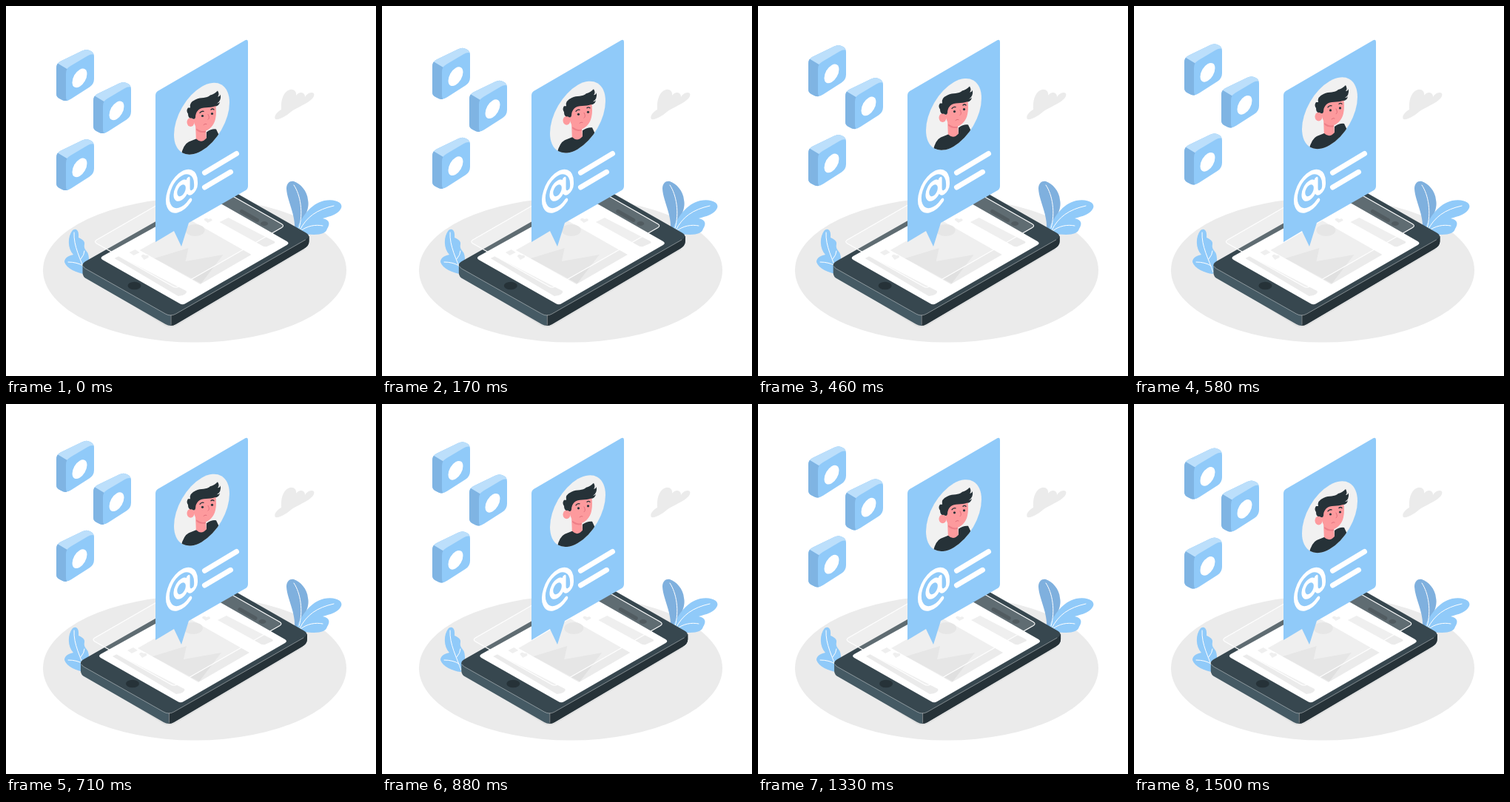
Recreate the animation shown at these times as an HTML page. Size 500 px wide and 500 px high, loop 1540 ms.

```html
<!DOCTYPE html>
<html lang="en">
<head>
<meta charset="utf-8">
<title>Profile card</title>
<style>
  html, body { margin: 0; height: 100%; overflow: hidden; background: #fff; }
  svg { display: block; width: 100%; height: 100%; }
  .line { fill: none; stroke: #fff; stroke-linecap: round; stroke-linejoin: round; }
  .blue { fill: #90caf9; }
  .dark { fill: #263238; }
  .skin { fill: #fd9a9d; }
</style>
</head>
<body>
<svg viewBox="0 0 500 500">
  <defs>
    <g id="tile">
      <path class="blue" d="M0 26Q0 19 6 16L35 2Q41-1 46 2Q51 4 51 10V40Q51 47 45 51L20 67Q14 71 9 69L5 67Q0 65 0 60Z"/>
      <path fill="#7fb4e3" d="M0 26Q0 21 2 19L14.500 26.500Q13 29 13 33V63Q13 68 14.500 69.600Q11 70 9 69L5 67Q0 65 0 60Z"/>
      <path fill="#bcdffb" d="M2 19Q3 17.500 6 16L35 2Q41-1 46 2Q50 4 50.500 7Q47 6 42 9L20 22Q15 25 14.500 26.500Z"/>
      <circle r="11.500" fill="#fff" transform="matrix(.866 -.5 0 1 31.500 39)"/>
    </g>
    <clipPath id="portrait"><circle r="43.300" transform="matrix(.866 -.5 0 1 264.500 152.800)"/></clipPath>
  </defs>

  <ellipse cx="255" cy="357" rx="205" ry="97.500" fill="#ebebeb"/>
  <path fill="#ebebeb" d="M364 153C361 148 368 142 372 140C371 127 375 115 384 113C390 112 393 117 392 121C396 115 404 116 404 123C406 119 412 115 416 118C418 123 412 127 408 130C400 135 390 139 385 143C378 149 370 154 364 153Z"/>

  <!-- leaves -->
  <path fill="#7fb0de" d="M390 304C392 282 380 264 379 247C379 239 384 236 389 237C398 240 407 250 408 262C411 275 402 286 395 304Z"/>
  <path class="blue" d="M391 306C398 286 412 267 430 263C445 260 456 266 453 273C449 282 438 284 428 287C438 289 438 295 434 301C432 309 420 311 396 307Z"/>
  <path class="line" d="M396 300C402 280 398 255 389 242M397 303C406 285 420 275 443 270M398 304C407 297 418 295 428 297"/>
  <path class="blue" d="M106 362C96 361 82 355 79 346C79 339 87 337 91 336C83 328 83 311 90 303C96 299 99 305 98 313C103 315 107 318 106 322C105 327 107 329 110 333C113 338 112 348 112 358Z"/>
  <path class="line" d="M107 360C101 342 91 325 92 306M84 346Q96 346 104 351M101 342Q106 336 106 331"/>

  <g id="phone">
    <path fill="#e0e0e0" d="M104 363L214 432Q222 436 230 432L404 329L400 324L222 420Z"/>
    <path fill="#455a64" d="M103 350V361Q103 366 109 369L215 430Q222 434 229 430L402 328Q409 324 409 318V311Z"/>
    <path class="dark" d="M222 416V432Q226 432 229 430L402 328Q409 324 409 318V311Z"/>
    <path fill="#37474f" d="M107 345Q99 350 107 355L215 416Q222 420 229 416L404 316Q413 311 404 306L297 245Q290 241 283 245Z"/>
    <path class="line" stroke-width=".8" opacity=".5" d="M104 352Q105 354 107 355L215 416Q222 420 229 416L404 316M222.500 418V431"/>
    <path fill="#fff" d="M130 338Q126 340.500 130 343L234 402Q238 404.500 242 402L379 323Q383 320.500 379 318L274 258Z"/>
    <ellipse class="dark" cx="173" cy="378" rx="9" ry="5.200"/>
    <path class="line" style="stroke:#263238" stroke-width="5" d="M318 277.500L339 289.500"/>
    <ellipse class="dark" cx="348.500" cy="294" rx="5" ry="3"/>

    <!-- screen content -->
    <g fill="#ebebeb">
      <path d="M180 330L250 290L331 336L262 376Z"/>
      <path d="M146 341L152 338L243 385Q245 388 238 391L232 392Z"/>
      <path d="M300 286L362 318Q364 320 361 321L352 325Q348 326 344 323L288 292Z"/>
      <path d="M166 333L174 329L180 333L172 337Z"/>
      <path d="M182 338Q184 334 188 337Q193 336 192 340L186 343Z"/>
      <path d="M267 289Q268 285 273 288Q278 286 278 290L272 293Z"/>
    </g>
    <g fill="#e0e0e0">
      <ellipse cx="255" cy="303" rx="13" ry="8"/>
      <path d="M200 341L246 327L242 345L293 336L263 375Z"/>
    </g>

    <!-- glass pane -->
    <path fill="#fff" fill-opacity=".2" stroke="#fff" stroke-width="1.100" d="M122 316Q118 318.500 122 321L225 379Q229 381.500 233 379L372 299.500Q376 297 372 294.500L269 236Q265 234 261 236Z"/>
  </g>

  <!-- card -->
  <path class="blue" d="M202 121Q202 117 205 115L322 47Q327 43.500 327 49V243Q327 247 324 249L247 293L237 325L227 304L202 319Z"/>
  <g class="line">
    <path stroke-width="5.600" transform="matrix(.866 -.5 0 1.080 237.500 250)" d="M13 18A22 22 0 1 1 22 0V3a6 6 0 0 1-12 0V-10M9 -1A9.500 9.500 0 1 0-10-1A9.500 9.500 0 1 0 9-1"/>
    <path stroke-width="7" d="M268.500 225.300L311.500 199.500M268.500 245L303.500 224.300"/>
  </g>

  <g id="avatar">
    <g clip-path="url(#portrait)">
      <path fill="#f1f1f1" d="M220 90H310V210H220Z"/>
      <path class="skin" d="M256 160L257 184Q266 190 271 180L270 167Z"/>
      <path fill="#ee7f88" d="M257 166Q263 170 270 169L270 171Q262 173 257 168Z"/>
      <path class="dark" d="M236 205Q239 188 247 184L257 180Q264 187 271 179L271 171Q278 166 284 167L292 184L270 205Z"/>
      <path class="skin" d="M253 143C253 156 254 165 263 169C272 172 281 163 283 153Q285 144 283 132L262 132Z"/>
      <ellipse class="skin" cx="249.500" cy="157.500" rx="5" ry="6"/>
      <path class="dark" d="M251 152Q246 153 246 146Q243 142 246 138L249 138Q247 131 256 127C264 123 271 126 276 121Q281 120 286 115Q289 120 286 123Q289 123 290 120Q291 129 285 132Q288 132 289 130Q288 136 282 136C276 139 265 136 260 141Q256 145 256 151Q255 155 251 152Z"/>
      <g class="dark"><circle cx="265.500" cy="149" r="1.600"/><circle cx="278.500" cy="146" r="1.600"/></g>
      <path class="line" style="stroke:#263238" stroke-width="1.300" d="M262 145Q264 142 267 143M277 140.500Q279 138.500 281 140.500"/>
      <path class="line" style="stroke:#e0707c" d="M273 147Q276 152 273 154M267 161Q269 159 271 160"/>
    </g>
  </g>

  <g id="tiles">
    <use href="#tile" x="68" y="58.900"/>
    <use href="#tile" x="118" y="102.900"/>
    <use href="#tile" x="68" y="179.900"/>
  </g>
</svg>
<script>
  const LOOP = 1540, STEP = LOOP / 37, LEAD = 40;
  const SHAKE = [0, -1, 2, -4, 4, -4, 4, -4, 2, -1, 0];
  const [phone, avatar, tiles] = ["phone", "avatar", "tiles"].map(id => document.getElementById(id));
  const move = (el, x, y) => el.setAttribute("transform", `translate(${x} ${y})`);

  function shakeAt(p) {
    const i = Math.floor(p * 10);
    return SHAKE[i] + (SHAKE[i + 1] - SHAKE[i]) * (p * 10 - i);
  }

  function draw(now) {
    // the picture advances 37 times per loop
    const time = Math.floor((now % LOOP + 4) / STEP) * STEP;
    const p = (time + LEAD) / LOOP % 1;
    const lift = -10 * (1 - Math.abs(1 - 2 * p));
    move(phone, shakeAt(p) + 0.8, 0);
    move(avatar, 0, lift);
    move(tiles, 0, lift);
  }

  let start;
  function tick(now) {
    start ??= now;
    draw(now - start);
    requestAnimationFrame(tick);
  }
  draw(0);
  requestAnimationFrame(tick);
</script>
</body>
</html>
```
